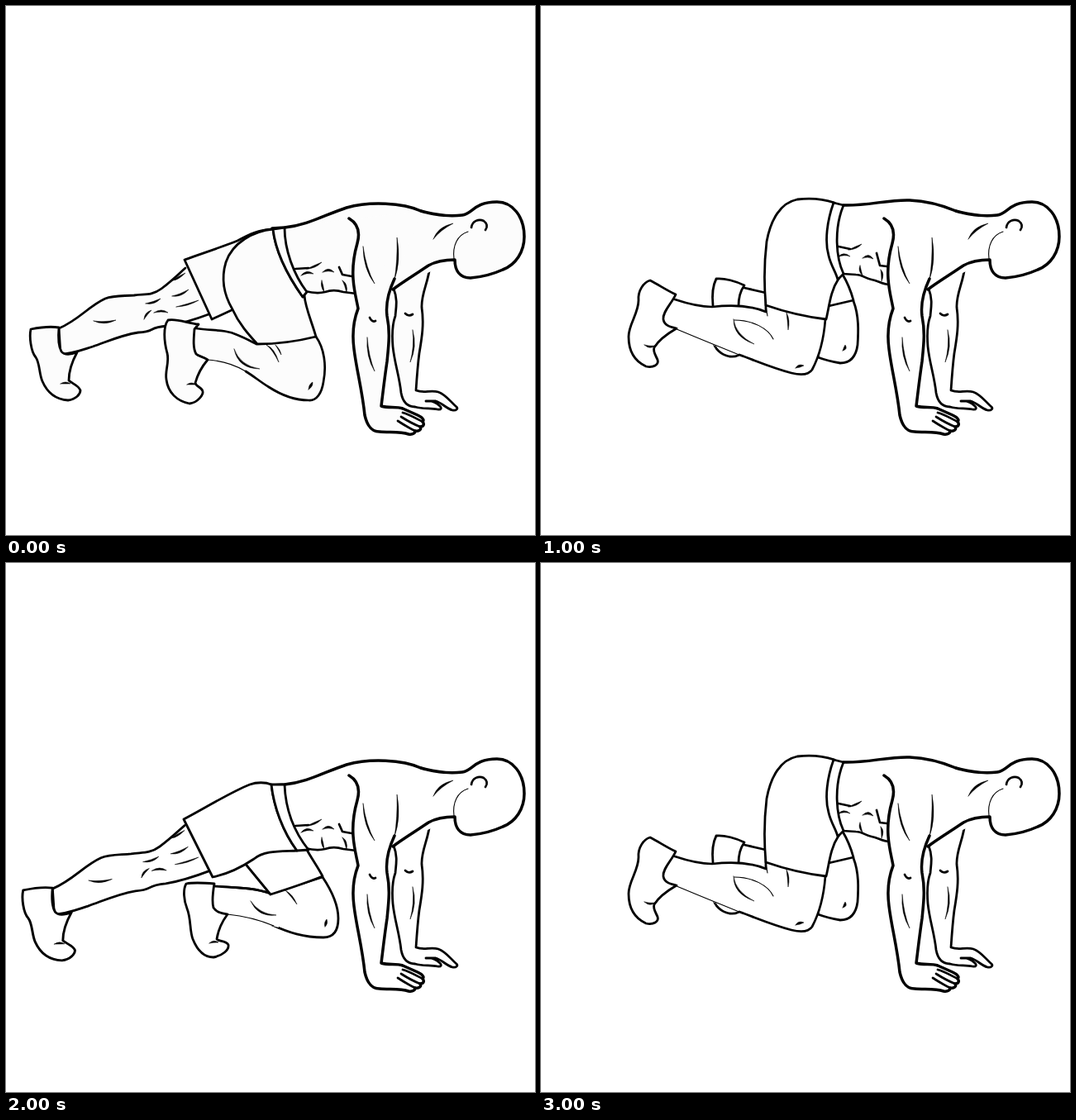
An HTML page that plays this animation: 640x640 px, repeating every 4 s.

```html
<!DOCTYPE html>
<html lang="en">
<head>
<meta charset="utf-8">
<title>Mountain climber exercise</title>
<style>
  html, body { margin: 0; width: 100%; height: 100%; overflow: hidden; background: #fff; }
  svg { display: block; width: 100%; height: 100%; --skin: #fff; }
  path { stroke: #000; stroke-linecap: round; stroke-linejoin: round; }
  .shape { fill: var(--skin); stroke-width: 2.8; }
  .fill { fill: var(--skin); stroke: none; }
  .line { fill: none; stroke-width: 2.7; }
  .thin { fill: none; stroke-width: 1.1; }
  .bold { fill: var(--skin); stroke-width: 3.5; }
  .mark { fill: #000; stroke-width: .5; }
</style>
</head>
<body>
<svg id="stage" viewBox="0 0 640 640"></svg>
<script>
const stage = document.getElementById('stage');
const HOLD = 1000;

const path = cls => d => `<path class="${cls}" d="${d}"/>`;
const [shape, fill, line, thin, bold] = ['shape', 'fill', 'line', 'thin', 'bold'].map(path);

// Tapered pen stroke along a quadratic curve, w wide at the middle.
function mark(x1, y1, cx, cy, x2, y2, w = 2.2) {
  const len = Math.hypot(x2 - x1, y2 - y1);
  const nx = -(y2 - y1) / len * w, ny = (x2 - x1) / len * w;
  return path('mark')(`M${x1} ${y1}Q${cx + nx} ${cy + ny} ${x2} ${y2}Q${cx - nx} ${cy - ny} ${x1} ${y1}Z`);
}

const farArm =
  shape('M469 342C474 355 472 364 471 375C467 386 467 400 468 412C470 432 476 448 478 468C480 479 486 485 495 485C505 488 513 486 522 488C527 489 527 486 525 484C521 480 515 477 508 478L520 478C527 480 533 487 540 489C545 490 547 487 545 485C538 479 532 470 523 467C514 464 506 469 496 465C497 450 498 435 500 420C503 402 506 385 503 365C502 348 511 335 513 314') +
  mark(492, 392, 496, 412, 489, 431, 1.8) +
  line('M483 372Q487 376 492 373');

const head =
  bold('M502 248C516 252 535 255 552 253C564 252 566 237 594 237C613 237 627 255 627 279C627 297 617 313 601 319C590 324 575 328 562 329C549 329 543 320 543 307C530 307 520 309 511 314C495 325 480 334 468 343') +
  thin('M542 306C540 290 546 277 559 273') +
  line('M563 268C564 260 572 257 578 260C582 263 583 267 580 271') +
  mark(517, 282, 524, 269, 541, 263, 2.6);

const nearArm =
  bold('M415 257C427 264 428 276 425 287C421 301 419 316 420 330C421 345 424 355 426 366C419 384 419 400 421 415C424 440 431 465 434 495C437 508 442 515 452 515C465 516 478 515 487 518C493 519 495 516 495 514C500 515 503 512 501 509C506 509 506 505 504 503C507 500 502 497 498 495L480 487C472 484 463 487 454 484C456 468 458 450 461 430C463 410 465 395 461 375C459 360 463 345 470 330') +
  mark(470, 331, 476, 308, 473, 280, 2.2) +
  line('M480 492C488 494 496 499 504 503M478 497C486 502 493 506 501 509M474 502C482 507 488 511 495 514') +
  mark(432, 291, 434, 318, 446, 336, 1.8) +
  mark(437, 401, 437, 424, 446, 442, 1.8) +
  line('M440 377Q443 383 447 381');

const torsoLow =
  fill('M323 270L337 268C365 265 385 253 412 244C440 236 480 238 502 248L543 307L469 343L424 348L362 345Z') +
  bold('M322 269L337 268C365 265 385 253 412 244C440 236 480 238 502 248') +
  line('M362 345C370 347 378 348 386 346C394 343 402 344 408 346L424 348M403 316L407 325L418 327') +
  line('M350 318L366 317') + mark(364, 318, 373, 316, 382, 310) +
  mark(357, 326, 364, 320, 372, 324) + mark(383, 322, 390, 317, 397, 322, 2.6) +
  mark(382, 332, 382, 339, 385, 346) + mark(407, 332, 412, 337, 412, 347);

const torsoHigh =
  fill('M354 238L366 241C395 242 420 234 446 235C470 236 490 243 502 248L543 307L469 343L419 337L365 324Z') +
  bold('M366 241C395 242 420 234 446 235C470 236 490 243 502 248') +
  line('M365 324L381 325C389 325 393 330 400 331C408 332 412 337 422 337M406 299L410 314L418 315') +
  line('M360 291L374 294') + mark(372, 295, 381, 293, 388, 288) +
  mark(359, 304, 366, 298, 374, 303) + mark(389, 305, 396, 300, 402, 306, 2.6) +
  mark(386, 314, 385, 320, 389, 326) + mark(411, 319, 414, 324, 412, 333);

const straightLeg =
  shape('M217 317C208 325 200 333 188 342C176 351 166 348 155 350C140 351 130 350 120 354C100 363 88 380 64 390L66 421C80 421 92 416 105 412C125 405 140 398 160 395C182 394 170 389 195 387C215 384 232 378 248 372') +
  shape('M64 389C52 387 40 389 30 391C28 400 30 418 36 425C41 432 40 445 44 454C50 468 60 476 75 477C84 476 90 470 90 465C88 459 80 457 76 453C76 440 80 430 86 419C78 422 71 423 67 418C63 411 63 400 64 389Z') +
  mark(66, 457, 72, 455, 78, 457) +
  mark(106, 381, 118, 385, 133, 380) + mark(167, 379, 169, 372, 176, 368) +
  mark(169, 360, 179, 360, 187, 354) + mark(179, 371, 188, 367, 196, 371) +
  mark(201, 351, 211, 351, 221, 343) + mark(206, 364, 220, 362, 233, 356, 1.6) +
  mark(202, 332, 207, 330, 217, 323);

const driveNear =
  // far thigh, still extended
  straightLeg +
  shape('M323 270C305 271 295 276 280 284C260 292 235 300 216 307L249 379L275 367') +
  torsoLow +
  // near leg, tucked
  fill('M231 390L304 408L375 399C385 414 388 435 384 455C382 468 376 478 366 477C350 477 335 472 318 461C300 450 285 436 262 430L230 421Z') +
  line('M375 400C385 414 388 435 384 455C382 468 376 478 366 477C350 477 335 472 318 461C308 455 300 448 290 442M230 390C250 393 265 391 280 398C290 402 297 406 303 409') +
  thin('M290 442C275 433 260 429 243 428') +
  shape('M233 385C220 384 208 378 196 380C190 388 191 405 195 420C198 430 192 442 194 452C196 468 207 478 222 481C232 480 239 470 238 466C237 461 230 461 229 456C232 445 238 435 244 428C238 424 233 424 230 421C226 414 227 403 228 391Z') +
  mark(219, 458, 224, 456, 230, 458) +
  mark(276, 415, 282, 437, 307, 439) + mark(366, 464, 369, 459, 371, 455, 3) +
  shape('M323 270C300 272 274 286 266 310C260 330 264 350 274 367C282 385 294 398 304 409C330 409 355 405 375 400C370 382 362 365 361 350L359 352C340 325 326 297 323 270Z') +
  mark(315, 410, 324, 415, 330, 431, 1.6) + mark(326, 410, 331, 416, 333, 422, 1.2) +
  shape('M323 270C326 297 340 325 359 352L364 346C348 325 337 295 337 268Z');

const driveFar =
  // far leg, tucked
  shape('M252 391C275 393 298 392 320 400L383 380C395 398 402 415 402 430C402 446 395 453 384 453C360 453 342 447 322 438') +
  fill('M252 391L320 400L330 441L268 425L251 417Z') +
  line('M252 391C275 393 298 392 320 400') +
  thin('M324 439C305 431 288 427 268 425') +
  shape('M252 388C240 387 228 386 218 388C214 395 215 408 219 418C224 430 222 445 226 455C232 470 240 477 251 477C262 475 270 468 269 462C267 457 257 458 255 455C257 442 262 433 268 425C262 424 255 423 251 417C249 410 250 400 252 388Z') +
  mark(246, 460, 251, 457, 257, 459) +
  mark(296, 409, 306, 427, 327, 426) + mark(386, 440, 387, 436, 388, 431, 3) +
  mark(338, 396, 346, 402, 352, 413, 1.6) +
  shape('M288 362L320 401C342 394 363 387 383 379C378 369 370 358 364 347') +
  torsoLow +
  // near leg, extended
  `<g transform="matrix(1.045 -.0244 0 1 -10.6 5.7)">${straightLeg}</g>` +
  shape('M321 268C314 265 303 265 295 268C270 278 240 297 215 310L250 380C270 376 285 368 300 358C312 348 330 349 352 348C335 325 324 295 321 268Z') +
  shape('M321 268C324 295 335 325 352 348L366 347C346 322 338 295 337 268Z');

const kneel =
  // far leg
  shape('M378 357C385 375 384 395 383 410C381 425 374 432 362 432C350 430 343 428 335 425L345 365') +
  mark(365, 417, 369, 414, 368, 410, 3) +
  shape('M246 341L272 347L272 375L239 375L239 363') +
  shape('M246 338C236 333 222 329 212 330C207 340 207 352 208 362L208 405C210 415 218 422 228 424C236 425 240 423 243 419L239 363C239 355 241 345 246 338Z') +
  shape('M365 325C371 335 375 345 378 356L348 363') +
  torsoHigh +
  // near leg
  fill('M162 355C180 361 195 364 207 364C230 361 255 363 273 370L344 379C342 405 336 425 328 440C324 446 315 447 303 444C280 438 265 430 245 424C220 415 190 403 160 389Z') +
  line('M162 355C180 361 195 364 207 364C232 361 253 362 272 370M344 379C342 405 336 425 328 440C324 446 315 447 303 444C280 438 262 430 240 422') +
  thin('M242 423C218 413 190 402 162 390M272 363L274 375') +
  shape('M163 349C152 344 142 337 132 332C124 334 117 345 118 356C118 372 106 385 106 400C106 418 114 430 127 436C136 438 143 434 141 428C139 423 135 418 137 413C142 405 152 397 164 390C155 388 149 386 148 379C147 370 158 360 163 349Z') +
  mark(125, 410, 132, 414, 138, 411) +
  mark(233, 379, 234, 399, 258, 409, 1.8) + thin('M234 380C256 380 275 390 281 403') +
  mark(308, 438, 312, 435, 318, 435, 3) +
  shape('M355 238C340 233 325 232 310 234C290 238 278 258 273 285C270 310 270 340 272 362C295 370 320 376 345 379C349 362 350 345 360 330') +
  mark(297, 371, 300, 380, 299, 392, 1.8) +
  shape('M354 238C346 260 343 285 348 302C351 315 357 322 359 331L366 324C357 305 354 270 366 241Z');

const poses = [
  { body: driveNear, skin: '#fcfcfc' },
  { body: kneel, skin: '#fff' },
  { body: driveFar, skin: '#fff' },
  { body: kneel, skin: '#fff' }
];

let shown = -1;
function draw(time) {
  const i = Math.floor(time / HOLD) % poses.length;
  if (i !== shown) {
    shown = i;
    stage.style.setProperty('--skin', poses[i].skin);
    stage.innerHTML = farArm + poses[i].body + head + nearArm;
  }
}

const start = performance.now();
function tick() {
  draw(performance.now() - start);
  requestAnimationFrame(tick);
}
tick();
</script>
</body>
</html>
```
